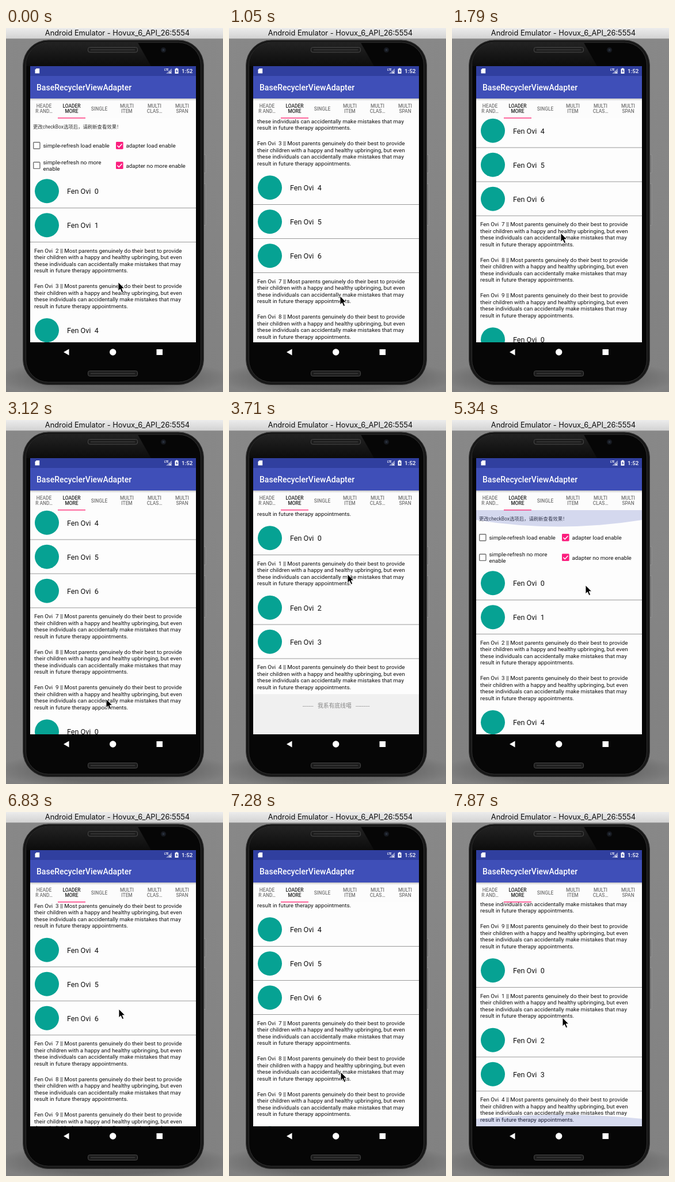
An HTML page that plays this animation: 377 by 630 pixels, repeating every 8000 ms.

```html
<!DOCTYPE html>
<html lang="en">
<head>
<meta charset="utf-8">
<title>List demo</title>
<style>
  html, body { margin: 0; width: 100%; height: 100%; overflow: hidden; background: #808080; }
  svg { display: block; width: 377px; height: 630px; }
  text { font-family: Roboto, "Noto Sans CJK SC", "Noto Sans CJK", sans-serif; white-space: pre; }
  .window { font: 12.8px Inter, sans-serif; fill: #0c0c0c; text-anchor: middle; }
  .clock { font-size: 9.8px; font-weight: 500; fill: #fff; }
  .bar { font-size: 14px; font-weight: 500; fill: #fff; }
  .tab { font-size: 8.4px; font-weight: 500; fill: #757575; text-anchor: middle; }
  .on { fill: #212121; }
  .note { font-size: 8.4px; fill: #333; }
  .body { font-size: 9.8px; fill: #111; }
  .name { font-size: 12.6px; fill: #111; }
  .end { font-size: 9.8px; fill: #868686; text-anchor: middle; }
</style>
</head>
<body>
<svg viewBox="0 0 377 630" xmlns="http://www.w3.org/2000/svg">
  <defs>
    <linearGradient id="chrome" x2="0" y2="1">
      <stop stop-color="#ececec"/><stop offset="1" stop-color="#d3d3d3"/>
    </linearGradient>
    <linearGradient id="wall" x2="0" y2="1">
      <stop stop-color="#888"/><stop offset="1" stop-color="#818181"/>
    </linearGradient>
    <linearGradient id="gloss" x2="0" y2="1">
      <stop stop-color="#222"/><stop offset="1" stop-color="#0c0c0c"/>
    </linearGradient>
    <linearGradient id="drop" x2="0" y2="1">
      <stop stop-color="#000" stop-opacity=".22"/><stop offset="1" stop-color="#000" stop-opacity="0"/>
    </linearGradient>
    <radialGradient id="floor">
      <stop offset=".6" stop-color="#585858" stop-opacity=".6"/><stop offset="1" stop-color="#585858" stop-opacity="0"/>
    </radialGradient>
    <clipPath id="view"><rect x="42" y="156" width="288" height="388"/></clipPath>
  </defs>

  <rect width="377" height="630" fill="url(#wall)"/>
  <ellipse cx="187" cy="606" rx="205" ry="34" fill="url(#floor)"/>
  <rect width="377" height="18" fill="url(#chrome)"/>
  <rect y="18" width="377" height="1" fill="#a2a2a2"/>
  <text class="window" x="193.500" y="13">Android Emulator - Hovux_6_API_26:5554</text>

  <g fill="#6f6f6f" stroke="#a0a0a0" stroke-width=".8">
    <rect x="344" y="219" width="2.800" height="32" rx="1"/>
    <rect x="344" y="269.500" width="2.800" height="72" rx="1"/>
  </g>
  <rect x="29.500" y="21" width="314" height="596.500" rx="44" fill="#171717" stroke="#3c3c3c"/>
  <rect x="34.500" y="25" width="304" height="588" rx="39" fill="#060606" stroke="#3a3a3a" stroke-width=".8"/>
  <path d="M73 25.500H229L252 66H35V63A38 38 0 0 1 73 25.500Z" fill="url(#gloss)"/>
  <g fill="#1d1d1d" stroke="#4a4a4a">
    <rect x="142.500" y="33.500" width="86" height="8.500" rx="3"/>
    <rect x="142.500" y="593.500" width="86" height="9" rx="3"/>
  </g>
  <path d="M147 37.700H224M147 598H224" stroke="#333" stroke-width="2"/>
  <circle cx="273.500" cy="38" r="4.500" fill="#171a20"/>
  <circle cx="273.500" cy="38" r="2" fill="#29313d"/>

  <rect x="42" y="66" width="288" height="478" fill="#fdfdfd"/>
  <g clip-path="url(#view)">
    <g id="list"></g>
    <path id="topGlow" fill="#3f51b5" d="M42 156H330V173Q186 196 42 173Z"/>
    <path id="endGlow" fill="#3f51b5" d="M42 544V531Q186 517 330 531V544Z"/>
  </g>

  <rect x="42" y="66" width="288" height="17" fill="#303f9f"/>
  <rect x="42" y="83" width="288" height="39" fill="#3f4fb8"/>
  <rect x="42" y="122" width="288" height="34" fill="#fcfcfc"/>
  <rect x="42" y="122" width="288" height="4" fill="url(#drop)"/>
  <rect x="90" y="155" width="48" height="1.500" fill="#ff3a80"/>
  <g fill="#fff">
    <path d="M52.700 70H58.200V78.500H50.500V72.200Z"/>
    <path d="M288 70V79H278Z" opacity=".45"/>
    <path d="M283.500 75.500L287 79M287 75.500L283.500 79" stroke="#fff"/>
    <text x="275" y="73.500" font-size="4.500" font-weight="700">LTE</text>
    <path d="M295 70.500V69.500H298V70.500H299.500V79H293.500V70.500Z"/>
    <path d="M297 71.500L295 75.200H296.400V78L298.400 74.300H297Z" fill="#303f9f"/>
  </g>
  <text class="clock" x="305" y="78">1:52</text>
  <text class="bar" x="53" y="108">BaseRecyclerViewAdapter</text>
  <g id="tabs"></g>

  <g fill="#fff">
    <path d="M109.500 555.500V566.500L100 561Z"/>
    <circle cx="185.700" cy="561" r="5.700"/>
    <rect x="261.500" y="556" width="10.500" height="10"/>
  </g>
  <path id="cursor" d="M0 0V15L3.400 11.700L6 17.600L8.600 16.500L6.100 10.800H10.800Z" fill="#000" stroke="#fff" stroke-width=".9"/>
</svg>
<script>
const LOOP = 8000, STEP = 148.5;
const ROW = 59, STORY_ROW = 61.5;
const PERSON = 'Fen Ovi';
const STORY = [
  'Most parents genuinely do their best to provide',
  'their children with a happy and healthy upbringing, but even',
  'these individuals can accidentally make mistakes that may',
  'result in future therapy appointments.'
];
const $ = id => document.getElementById(id);

const label = (cls, x, y, s) => `<text class="${cls}" x="${x}" y="${y}">${s}</text>`;
const box = (x, y, w, h, fill) => `<rect x="${x}" y="${y}" width="${w}" height="${h}" fill="${fill}"/>`;

function checkbox(x, y, checked, lines) {
  const mark = checked
    ? `<rect x="${x}" y="${y - 6.3}" width="12.6" height="12.6" rx="1.4" fill="#fb1e7e"/>
       <path d="M${x + 2.4} ${y + .1}l2.800 2.800l5.200 -5.600" fill="none" stroke="#fff" stroke-width="1.500"/>`
    : `<rect x="${x + .7}" y="${y - 5.6}" width="11.2" height="11.2" rx="1" fill="none" stroke="#707070" stroke-width="1.400"/>`;
  const first = y + 3.7 - (lines.length - 1) * 5.75;
  return mark + lines.map((s, i) => label('body', x + 17.5, first + i * 11.5, s)).join('');
}

function pictureRow(y, n) {
  return `<circle cx="71" cy="${y + 29.7}" r="21" fill="#06a293"/>`
    + label('name', 106, y + 34.7, `${PERSON}  ${n}`)
    + box(42, y + ROW - .5, 288, 1, '#999');
}

function storyRow(y, n) {
  return STORY.map((s, i) =>
    label('body', 49, y + 18 + i * 11.5, i ? s : `${PERSON}  ${n} || ${s}`)).join('');
}

function buildList() {
  let y = 252.5;
  let out = label('note', 47, 174, '更改checkBox选项后，请刷新查看效果！')
    + checkbox(47, 203.4, false, ['simple-refresh load enable'])
    + checkbox(191, 203.4, true, ['adapter load enable'])
    + checkbox(47, 237.8, false, ['simple-refresh no more', 'enable'])
    + checkbox(191, 237.8, true, ['adapter no more enable']);
  const stories = [2, 3, 7, 8, 9, 11, 14];
  for (let i = 0; i < 15; i++) {
    const story = stories.includes(i);
    out += (story ? storyRow : pictureRow)(y, i % 10);
    y += story ? STORY_ROW : ROW;
  }
  out += box(42, y, 288, 90, '#f0f0f0')
    + label('end', 186, y + 23.7, '-------   我系有底线噶   ---------');
  $('list').innerHTML = out;
}

function buildTabs() {
  const tabs = ['HEADE/R AND…', 'LOADER/MORE', 'SINGLE', 'MULTI/ITEM', 'MULTI/CLAS…', 'MULTI/SPAN'];
  $('tabs').innerHTML = tabs.map((tab, i) => {
    const lines = tab.split('/');
    const y = lines.length > 1 ? 137.6 : 142.6;
    return lines.map((s, k) => label(i === 1 ? 'tab on' : 'tab', 66 + i * 48, y + k * 9.8, s)).join('');
  }).join('');
}

// Tracks: [step, value...], linear between entries.
const scroll = [[1, 0], [2, 20], [3, 90], [4, 160], [5, 210], [7, 247], [8, 290], [9, 325], [10, 345.5],
  [21, 345.5], [22, 530], [23, 680.5], [31, 680.5], [32, 640], [33, 480], [34, 250], [35, 60], [36, 0],
  [41, 0], [42, 30], [43, 110], [45, 250], [46, 284.5], [49, 320], [50, 400], [51, 500], [52, 580], [53, 610.5]];
const pointer = [[0, 195, 440], [3, 190, 360], [7, 193, 464], [10, 192, 380], [14, 185, 330], [21, 174, 483],
  [23, 200, 280], [24, 206, 261], [31, 209, 301], [34, 230, 425], [36, 232, 286], [38, 230, 310], [39, 230, 310],
  [41, 205, 440], [46, 196, 341], [49, 194, 450], [53, 192, 356]];
const topGlow = [[34, 0], [36, .22], [38, 0]];
const endGlow = [[22, 0], [23, .2], [25, 0], [52, 0], [53, .2]];

function sample(track, step) {
  const next = track.findIndex(k => k[0] >= step);
  if (next < 0) return track[track.length - 1].slice(1);
  if (next === 0) return track[0].slice(1);
  const a = track[next - 1], b = track[next];
  const p = (step - a[0]) / (b[0] - a[0]);
  return a.slice(1).map((v, i) => v + (b[i + 1] - v) * p);
}

function draw(time) {
  const step = Math.floor((time % LOOP + 6) / STEP);
  const [offset] = sample(scroll, step);
  const [x, y] = sample(pointer, step);
  $('list').setAttribute('transform', `translate(0 ${-offset})`);
  $('cursor').setAttribute('transform', `translate(${Math.round(x)} ${Math.round(y)})`);
  $('topGlow').setAttribute('opacity', sample(topGlow, step)[0]);
  $('endGlow').setAttribute('opacity', sample(endGlow, step)[0]);
}

buildList();
buildTabs();
draw(0);
const start = performance.now();
(function tick() {
  draw(performance.now() - start);
  requestAnimationFrame(tick);
})();
</script>
</body>
</html>
```
